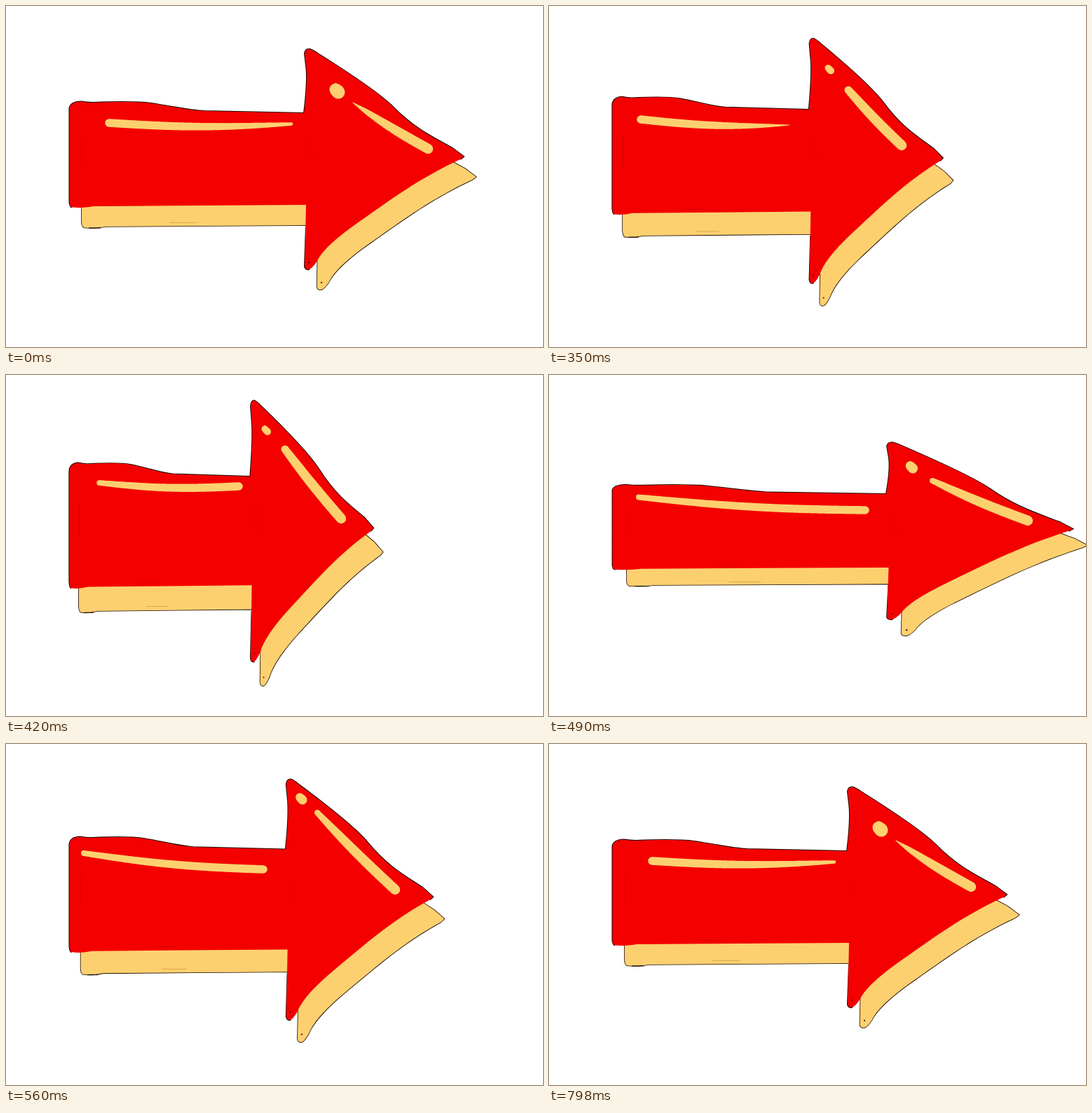
These frames come from a looping animation (766x487 px, 0.91 s). An HTML page with a canvas:

```html
<!DOCTYPE html>
<html lang="en">
<head>
<meta charset="utf-8">
<title>Bouncing arrow</title>
<style>
  html, body { margin: 0; width: 100%; height: 100%; overflow: hidden; background: #fff; }
  canvas { display: block; }
</style>
</head>
<body>
<canvas id="stage" width="766" height="487"></canvas>
<script>
const ctx = document.getElementById('stage').getContext('2d');
const RED = '#f40000', GOLD = '#fdd06f', INK = '#1a0800';
const LEFT = 90, TOP = 61;

// The arrow at rest. The shadow is the same body, shifted.
const rim = `M94 287.5 Q90 286 90.5 276 V146 Q92 137 107 136.5 Q116 138 124 138
  C150 137 185 136 207 139 C235 143 262 149 283 150 L425 153
  Q431 105 428 85 L426 68 Q427 61 433 61.5 Q438 63 445 68
  C480 90 530 122 552 144 C582 175 610 188 637 203 L653 215 L648 219`;
const body = rim + `C590 246 555 272 490 318 C470 333 455 346 446 360
  Q440 372 433 376 Q427 377 426 372 L428 284 L270 285 L125 286 Q112 288 103 288 Z`;
const neck = 'M428 315 L426 372 Q427 377 433 376';
const creases = 'M108.5 187 V225 M215 280.5 H252 M436 194 V199 M433 212 L438 216';

// stretch: scale x, scale y, top; bar and streak: thick end, thin end, thin radius;
// dot: centre, radius.
const poses = [
  { stretch: [1, 1, 61], bar: [147, 167, 407, 168.5, 2.3],
    streak: [602, 204, 495, 138, .5], dot: [472, 121, 9.5] },
  { stretch: [.838, 1.11, 46], bar: [131, 162, 343, 170, .5],
    streak: [503, 199, 427, 120, 5.5], dot: [400, 90.5, 5] },
  { stretch: [.771, 1.185, 36], bar: [332, 159, 133, 154, 3.7],
    streak: [478, 205, 398, 106, 5.5], dot: [371, 79, 5] },
  { stretch: [1.167, .803, 96], bar: [451, 193, 128, 174.5, 4],
    streak: [683, 208, 547, 151, 4], dot: [517, 131.5, 7] },
  { stretch: [.922, 1.092, 50], bar: [367, 179, 111, 156, 4],
    streak: [555, 208, 444, 98, 4], dot: [421, 78, 6.5] }
];

// A sagging stroke that stays thick and tapers late.
function brush([x1, y1, x2, y2, thin], thick, sag) {
  const path = new Path2D(), steps = 200;
  for (let i = 0; i <= steps; i++) {
    const u = i / steps;
    const x = x1 + (x2 - x1) * u;
    const y = y1 + (y2 - y1) * u + sag * Math.sin(Math.PI * u);
    const r = thick + (thin - thick) * u ** 3;
    path.moveTo(x + r, y);
    path.arc(x, y, r, 0, 7);
  }
  fill(path, GOLD);
}

function stretcher([sx, sy, top]) {
  return (d, dx = 0, dy = 0) => {
    const path = new Path2D();
    const x = LEFT + (dx - LEFT) * sx, y = top + (dy - TOP) * sy;
    path.addPath(new Path2D(d), new DOMMatrix([sx, 0, 0, sy, x, y]));
    return path;
  };
}

function stroke(path, color, width) {
  ctx.strokeStyle = color;
  ctx.lineWidth = width;
  ctx.stroke(path);
}

function fill(path, color) {
  ctx.fillStyle = color;
  ctx.fill(path);
}

function draw({ stretch, bar, streak, dot: [x, y, r] }) {
  const fit = stretcher(stretch);
  ctx.fillStyle = '#fff';
  ctx.fillRect(0, 0, 766, 487);

  const shadow = fit(body, 17.5, 29);
  stroke(shadow, INK, 1.6);
  fill(shadow, GOLD);
  stroke(fit('M233 309.5 H272'), '#d9a94e', 1);
  stroke(fit('M118 317 H135'), INK, 1.2);

  stroke(fit(rim), INK, 2);
  stroke(fit(neck), INK, 2);
  fill(fit(body), RED);
  stroke(fit(creases), '#dc0000', 1);
  stroke(fit('M431 366 H433 M449 395 H451'), '#4a1000', 2);

  brush(bar, 5.8, 4.5);
  brush(streak, 7.2, 2);
  brush([x + 2, y + 2, x - 2, y - 2, r * .9], r, 0);
}

let shown;
function tick(now) {
  const t = now % 910;
  const pose = poses[t < 350 || t >= 630 ? 0 : 1 + Math.floor((t - 350) / 70)];
  if (pose !== shown) draw(shown = pose);
  requestAnimationFrame(tick);
}
tick(0);
</script>
</body>
</html>
```
